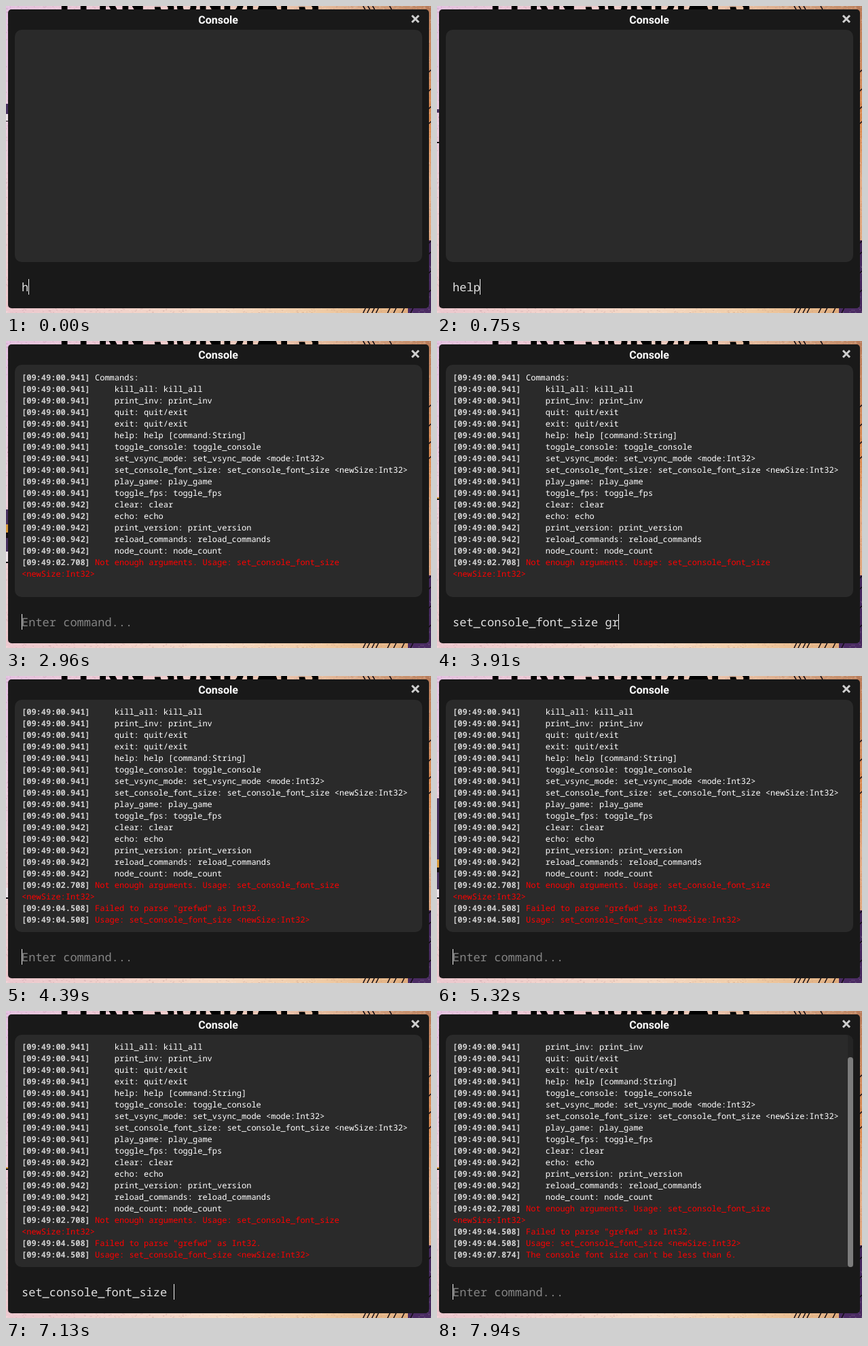
An HTML page with a canvas that plays this animation: 626 px wide and 452 px high, repeating every 8000 ms.

```html
<!DOCTYPE html>
<html lang="en">
<head>
<meta charset="utf-8">
<title>Console</title>
<style>
html, body { margin: 0; width: 100%; height: 100%; overflow: hidden; background: #191919; }
canvas, svg { position: absolute; left: 0; top: 0; width: 626px; height: 452px; }
text { white-space: pre; text-rendering: geometricPrecision; font-family: "Roboto Mono", "Noto Sans Mono", monospace; }
.big { font: 900 51px Roboto, sans-serif; }
.head { font: 700 16px Roboto, sans-serif; fill: #fff; text-anchor: middle; }
.log { font-size: 12px; fill: #fff; }
.stamp { font-weight: 700; fill: #d2d2d2; }
.error { fill: #f00; }
.entry { font-size: 17px; fill: #e0e0e0; }
.hint { fill: #858585; }
</style>
</head>
<body>
<canvas id="scene" width="626" height="452"></canvas>
<svg viewBox="0 0 626 452">
  <defs><clipPath id="view"><rect x="13" y="45" width="600" height="322"/></clipPath></defs>
  <text class="big" x="79" y="13">FERN SUNDIALS</text>
  <rect x="3" y="5" width="620" height="440" rx="5" fill="#191919"/>
  <rect x="13" y="35" width="600" height="342" rx="10" fill="#2a2a2a"/>
  <text class="head" x="312.5" y="25.5">Console</text>
  <path d="M598 14l10 10M608 14l-10 10" stroke="#cfcfcf" stroke-width="3" fill="none"/>
  <g clip-path="url(#view)"><g id="log"></g></g>
  <g id="bar">
    <path d="M605 35.4Q613 37 613 45V377H605Z" fill="#242424"/>
    <rect x="605" y="68" width="8" height="309" rx="4" fill="#7c7c7c"/>
  </g>
  <text id="entry" class="entry" x="23" y="420"></text>
  <rect id="caret" y="402" width="1" height="23" fill="#f0f0f0"/>
</svg>
<script>
const LOOP = 8000, ROW = 17, VIEW = 322, WALK = 806;
const $ = id => document.getElementById(id);
const NS = 'http://www.w3.org/2000/svg';
const SIZE = 'set_console_font_size';

// Log rows: [stamp, text, is error]
const usage = `${SIZE} <newSize:Int32>`;
const commands = [
  'kill_all: kill_all', 'print_inv: print_inv', 'quit: quit/exit', 'exit: quit/exit',
  'help: help [command:String]', 'toggle_console: toggle_console',
  'set_vsync_mode: set_vsync_mode <mode:Int32>', `${SIZE}: ${usage}`,
  'play_game: play_game', 'toggle_fps: toggle_fps', 'clear: clear', 'echo: echo',
  'print_version: print_version', 'reload_commands: reload_commands', 'node_count: node_count'
];
const rows = [
  ['00.941', 'Commands:'],
  ...commands.map((c, i) => [i < 10 ? '00.941' : '00.942', '    ' + c]),
  ['02.708', `Not enough arguments. Usage: ${SIZE}`, true],
  ['', '<newSize:Int32>', true],
  ['04.508', 'Failed to parse "grefwd" as Int32.', true],
  ['04.508', `Usage: ${usage}`, true],
  ['07.874', "The console font size can't be less than 6.", true]
];

function span(parent, cls, text) {
  const el = document.createElementNS(NS, 'tspan');
  el.setAttribute('class', cls);
  el.textContent = text;
  parent.append(el);
}

const lines = rows.map(([stamp, text, error], i) => {
  const el = document.createElementNS(NS, 'text');
  el.setAttribute('class', 'log');
  el.setAttribute('x', 23);
  el.setAttribute('y', 58 + ROW * i);
  if (stamp) span(el, 'stamp', `[09:49:${stamp}] `);
  span(el, error ? 'error' : '', text);
  $('log').append(el);
  return el;
});

// Steps: [time, entry text, rows shown]
const steps = [
  [0, 'h', 0], [150, 'he', 0], [310, 'hel', 0], [470, 'help', 0], [820, '', 16],
  [1590, 's', 16], [1690, 'se', 16], [1790, 'set', 16], [1890, SIZE, 16], [2590, '', 18],
  [3290, SIZE, 18],
  ...[...' grefwd'].map((c, i) => [3700 + 80 * i, SIZE + ' grefwd'.slice(0, i + 1), 18]),
  [4390, '', 20], [5630, SIZE, 20], [6430, SIZE + ' ', 20], [7330, SIZE + ' 4', 20],
  [7740, '', 21]
];

function show([, text, count]) {
  lines.forEach((el, i) => el.style.display = i < count ? '' : 'none');
  $('log').setAttribute('transform', `translate(0 ${-Math.max(0, count * ROW - VIEW)})`);
  $('bar').style.display = count > 20 ? '' : 'none';
  $('entry').textContent = text || 'Enter command...';
  $('entry').setAttribute('class', text ? 'entry' : 'entry hint');
  $('caret').setAttribute('x', 23 + Math.floor(text.length * 10.2));
}

const ctx = $('scene').getContext('2d');

function fill(color, x, y, w, h) {
  ctx.fillStyle = color;
  ctx.fillRect(x, y, w, h);
}

function blend(x0, y0, x1, y1, colors) {
  const g = ctx.createLinearGradient(x0, y0, x1, y1);
  colors.forEach((c, i) => g.addColorStop(i / (colors.length - 1), c));
  return g;
}

// Only a thin rim of the scene shows around the console
function paintScene() {
  fill(blend(0, 0, 626, 0, ['#e4c3e0', '#eec9d3', '#f0cfc6', '#e6bb9c', '#c08560']), 0, 0, 626, 8);
  fill(blend(0, 0, 0, 452, ['#e5c2e2', '#eccbe0', '#f0d0d5', '#edc8cc']), 0, 0, 8, 452);
  fill(blend(0, 0, 626, 0, ['#ecc8cf', '#f2d2cb', '#f5d9c4', '#f0cba4', '#dda673']), 0, 440, 626, 12);
  fill(blend(0, 0, 0, 345, ['#b97c5a', '#cf8c60', '#dd8a4c', '#e6ad85', '#dfa57c']), 618, 0, 8, 345);
  fill('#46285f', 618, 345, 8, 107);
  fill('#4a2b63', 592, 445, 34, 7);
  let seed = 7;
  const rand = () => (seed = seed * 16807 % 2147483647) / 2147483647;
  for (let i = 0; i < 1100; i++) {
    const along = rand(), across = rand() * 7, side = i % 4;
    const tone = rand() < .5 ? 'rgba(255,245,240,.22)' : 'rgba(110,50,70,.14)';
    if (side < 2) fill(tone, along * 626, side ? 445 + across : across, 2, 1);
    else fill(tone, side > 2 ? 620 + across : across, along * 452, 1, 2);
  }
  ctx.strokeStyle = '#120b12';
  ctx.lineWidth = 1.5;
  ctx.beginPath();
  for (const x of [526, 532, 539, 545, 562, 571, 583, 596]) {
    ctx.moveTo(x, 452);
    ctx.lineTo(x + 4, 444);
  }
  for (const x of [526, 533, 540, 565]) {
    ctx.moveTo(x, 0);
    ctx.lineTo(x + 3, 5);
  }
  for (const y of [94, 122, 148, 170, 346, 362, 390, 418]) {
    ctx.moveTo(622, y + 4);
    ctx.lineTo(626, y);
  }
  ctx.stroke();
}

// Walking figure's sliver at the left edge: [y, height, colour]
const BLACK = '#140d14', PURPLE = '#48305f', GOLD = '#d99a3c', PALE = '#f1e3ea';
const poses = [
  [[144, 15, PURPLE], [159, 10, PALE], [169, 1, BLACK]],
  [[168, 2, BLACK]],
  [],
  [[312, 14, PALE], [326, 2, BLACK]],
  [[180, 90, PURPLE], [270, 12, GOLD], [282, 7, BLACK], [289, 25, PURPLE], [314, 12, PALE], [326, 2, BLACK]],
  [[248, 22, PURPLE], [270, 12, GOLD], [282, 8, BLACK], [290, 20, PURPLE], [310, 15, PALE], [325, 2, BLACK]],
  [[230, 2, GOLD], [232, 2, BLACK]],
  [[152, 5, PURPLE], [200, 2, BLACK]]
];

paintScene();
const still = ctx.getImageData(0, 0, 3, 452);
let lastStep, lastPose;

function frame() {
  const t = performance.now() % LOOP;
  const step = steps.filter(s => s[0] <= t).pop();
  if (step !== lastStep) show(lastStep = step);
  const pose = poses[Math.floor(t % WALK / WALK * poses.length)];
  if (pose !== lastPose) {
    lastPose = pose;
    ctx.putImageData(still, 0, 0);
    for (const [y, h, color] of pose) fill(color, 0, y, 3, h);
  }
  requestAnimationFrame(frame);
}
frame();
</script>
</body>
</html>
```
